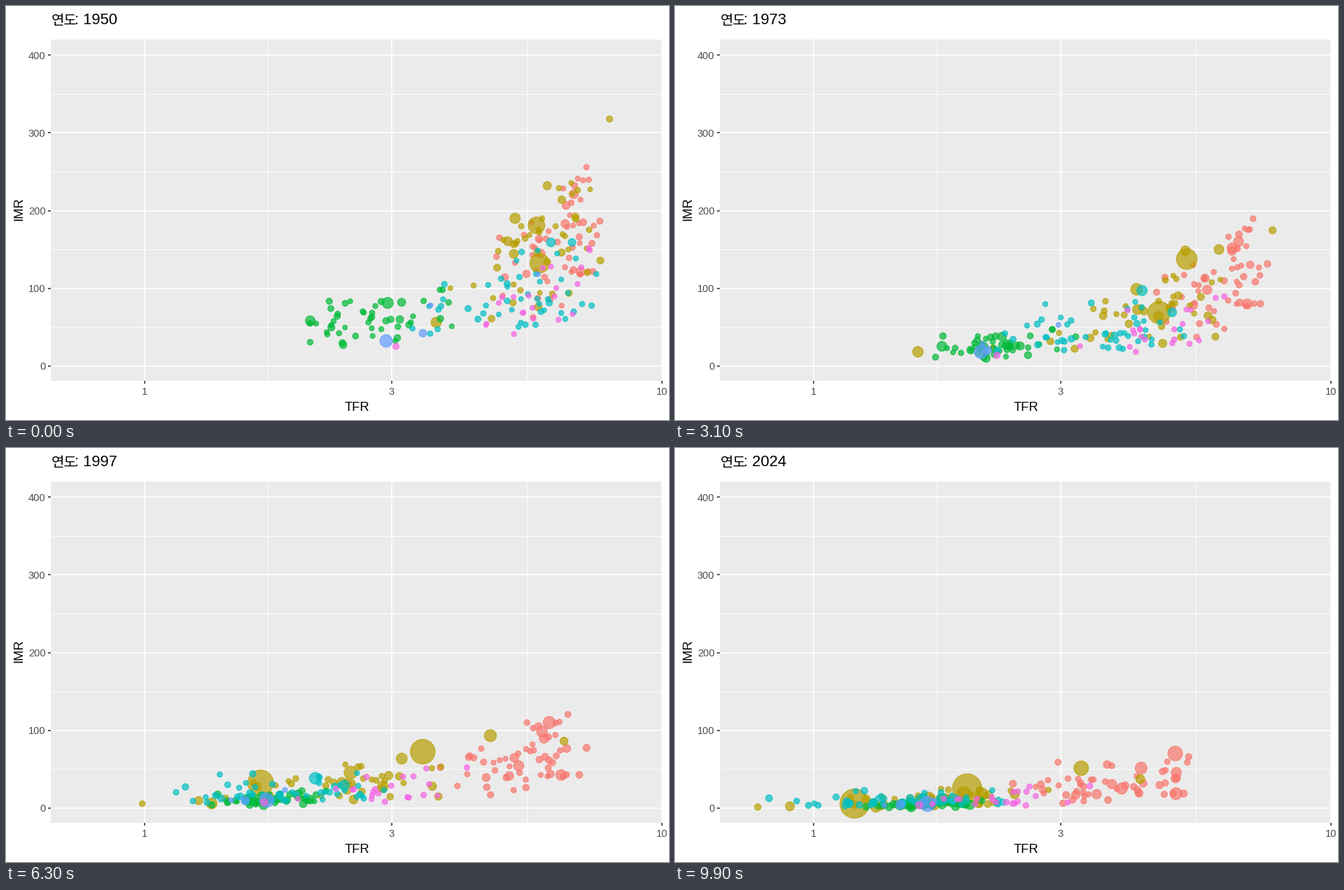
Animation of 947x592 px, one loop 10 s. Source, as a matplotlib script:

```python
import numpy as np
import matplotlib.pyplot as plt
from matplotlib.animation import FuncAnimation
from matplotlib.patches import Rectangle

W, H, DPI = 947, 592, 64
PT = 72 / DPI  # points per pixel
FRAMES = 100
FIRST, LAST = 1950, 2024
LEFT, RIGHT, TOP, BOTTOM = 64.5, 937.5, 47.5, 535.5
STROKE = 1.2

AFRICA, ASIA, EUROPE = "#F8766D", "#B79F00", "#00BA38"
LATIN, NORTH, OCEANIA = "#00BFC4", "#619CFF", "#F564E3"

rng = np.random.default_rng(7)
progress = np.linspace(0, 1, FRAMES)
years = FIRST + (LAST - FIRST) * progress
dots = []  # (colour, xs, ys, radii), each with one value per frame


def tfr_x(v):
    return 198 + 739 * np.log10(v)


def imr_y(v):
    return 514.5 - 1.11 * v


def add(color, tfr, imr, r0, r1):
    radii = r0 + (r1 - r0) * progress
    dots.append((color, tfr_x(tfr), imr_y(imr), radii))


def country(color, r0, r1, tfr, imr, mid, lag=1.0):
    """Births fall along an S-curve around `mid`, deaths fall geometrically."""
    s = 1 / (1 + np.exp((years - mid) / 11))
    fall = (s - s[0]) / (s[-1] - s[0])
    births = tfr[0] * (tfr[1] / tfr[0]) ** fall
    deaths = imr[0] * (imr[1] / imr[0]) ** progress ** lag
    add(color, births, deaths, r0, r1)


def crowd(color, n, tfr, spread, imr, mid, rho=0.45, scale=0.7, lag=1.0):
    """Countries scattered around the typical path of their continent."""
    for _ in range(n):
        a, b, c = rng.triangular(-3, 0.4, 1.5, 3)
        late = 0.7 * (a + b)
        d = min(rho * a + np.sqrt(1 - rho ** 2) * c, 1.4)
        births = (tfr[0] * 10 ** (spread[0] * a), tfr[1] * 10 ** (spread[1] * late))
        deaths = (imr[0] * np.exp(0.35 * d), imr[1] * np.exp(0.6 * d))
        e = min(rng.exponential(scale), 3)
        country(color, 4 + e, 4.3 + 1.6 * e, births, deaths,
                mid + rng.normal(0, 6), lag)


country(AFRICA, 6.5, 11, (6.5, 5), (183, 70), 2012, 1.4)
crowd(AFRICA, 55, (6.6, 4.1), (0.055, 0.1), (180, 36), 2013, lag=1.3)

# China: famine, recovery, then a steep fall
key_years = [1950, 1957, 1960, 1963, 1973, 1980, 1990, 1998, 2016, 2024]
births = [5.8, 5.8, 4.45, 7.4, 4.7, 2.9, 2.5, 1.57, 1.77, 1.2]
deaths = [132, 120, 198, 95, 69, 52, 41, 31, 8, 5.5]
add(ASIA, np.interp(years, key_years, births),
    np.interp(years, key_years, deaths), 14.5, 21.5)
country(ASIA, 12.5, 21.5, (5.72, 1.98), (181, 25), 2000, 1.7)
country(ASIA, 8, 11, (5.2, 1.95), (190, 18), 1986, 1.1)
country(ASIA, 6, 11, (6.4, 3.29), (214, 51), 2000, 1.2)
country(ASIA, 6.5, 9.5, (6, 2.11), (232, 18), 1993, 1.5)
country(ASIA, 8, 8.5, (3.66, 1.32), (56, 1.5), 1945)
country(ASIA, 5, 7, (7.92, 4.28), (318, 37), 2008, 1.1)
country(ASIA, 5.5, 7, (6, 0.9), (134, 2), 1981)
country(ASIA, 4, 5.2, (3.9, 0.78), (100, 1), 1978)
crowd(ASIA, 41, (6.3, 2.1), (0.065, 0.12), (170, 14), 1987)

country(EUROPE, 8.5, 9, (2.95, 1.54), (81, 5), 1970, 0.7)
country(EUROPE, 7.5, 8, (2.09, 1.54), (58, 4), 1968)
crowd(EUROPE, 46, (2.55, 1.5), (-0.085, -0.06), (60, 4), 1977, rho=-0.4)

country(LATIN, 7, 10, (6.1, 1.62), (159, 9.5), 1983, 1.5)
country(LATIN, 6, 9, (6.7, 1.77), (159, 11), 1985)
crowd(LATIN, 47, (5.7, 1.75), (0.09, 0.11), (108, 13), 1980, scale=0.45)

country(NORTH, 9.5, 11.5, (2.93, 1.66), (32, 5), 1966)
country(NORTH, 6, 7, (3.45, 1.47), (42, 4), 1968)
country(NORTH, 4, 4.3, (5.76, 1.71), (118, 9), 1968)
country(NORTH, 4, 4.2, (3.57, 1.37), (78, 3), 1968)

country(OCEANIA, 5, 6, (3.06, 1.6), (25, 3.5), 1972)
crowd(OCEANIA, 21, (6.3, 2.65), (0.055, 0.07), (105, 15), 1985,
      rho=0.3, scale=0.15)

colors = [d[0] for d in dots]
xs, ys, radii = (np.array([d[i] for d in dots]) for i in (1, 2, 3))
sizes = ((2 * radii - STROKE) * PT) ** 2

plt.rcParams["font.family"] = "Liberation Sans"
fig = plt.figure(figsize=(W / DPI, H / DPI), dpi=DPI, facecolor="white")
ax = fig.add_axes([0, 0, 1, 1])
ax.set(xlim=(0, W), ylim=(H, 0))
ax.axis("off")


def line(x, y, color="white", width=1.6):
    ax.plot(x, y, color=color, lw=width * PT, solid_capstyle="butt", zorder=1)


def label(x, y, text, px, color="black", **kw):
    return ax.text(x, y, text, fontsize=px * PT, color=color, **kw)


ax.add_patch(Rectangle((LEFT, TOP), RIGHT - LEFT, BOTTOM - TOP,
                       fc="#EBEBEB", ec="none", zorder=0))
for v in (3 ** 0.5, 30 ** 0.5):
    line([tfr_x(v)] * 2, [TOP, BOTTOM], width=0.9)
for v in range(50, 400, 100):
    line([LEFT, RIGHT], [imr_y(v)] * 2, width=0.9)
for v in (1, 3, 10):
    x = tfr_x(v)
    line([x, x], [TOP, BOTTOM])
    line([x, x], [BOTTOM, BOTTOM + 4.6], "#333333")
    label(x, 556, str(v), 14.67, "#4D4D4D", ha="center")
for v in range(0, 500, 100):
    y = imr_y(v)
    line([LEFT, RIGHT], [y, y])
    line([LEFT - 4.6, LEFT], [y, y], "#333333")
    label(56.5, y + 5.5, str(v), 14.67, "#4D4D4D", ha="right")

label(501, 579, "TFR", 18.33, ha="center")
label(23.5, 290.5, "IMR", 18.33, rotation=90, rotation_mode="anchor",
      ha="center", va="baseline")
label(64.5, 26.5, "연도", 20, family="Noto Sans CJK JP")
title = label(98, 26.5, "", 22)

points = ax.scatter(xs[:, 0], ys[:, 0], s=sizes[:, 0], c=colors,
                    edgecolors=colors, linewidths=STROKE * PT,
                    alpha=0.7, zorder=3)


def update(i):
    points.set_offsets(np.column_stack([xs[:, i], ys[:, i]]))
    points.set_sizes(sizes[:, i], DPI)
    title.set_text(f": {round(years[i])}")
    return points, title


anim = FuncAnimation(fig, update, frames=FRAMES, interval=100,
                     repeat=True, repeat_delay=0)
plt.show()
```
